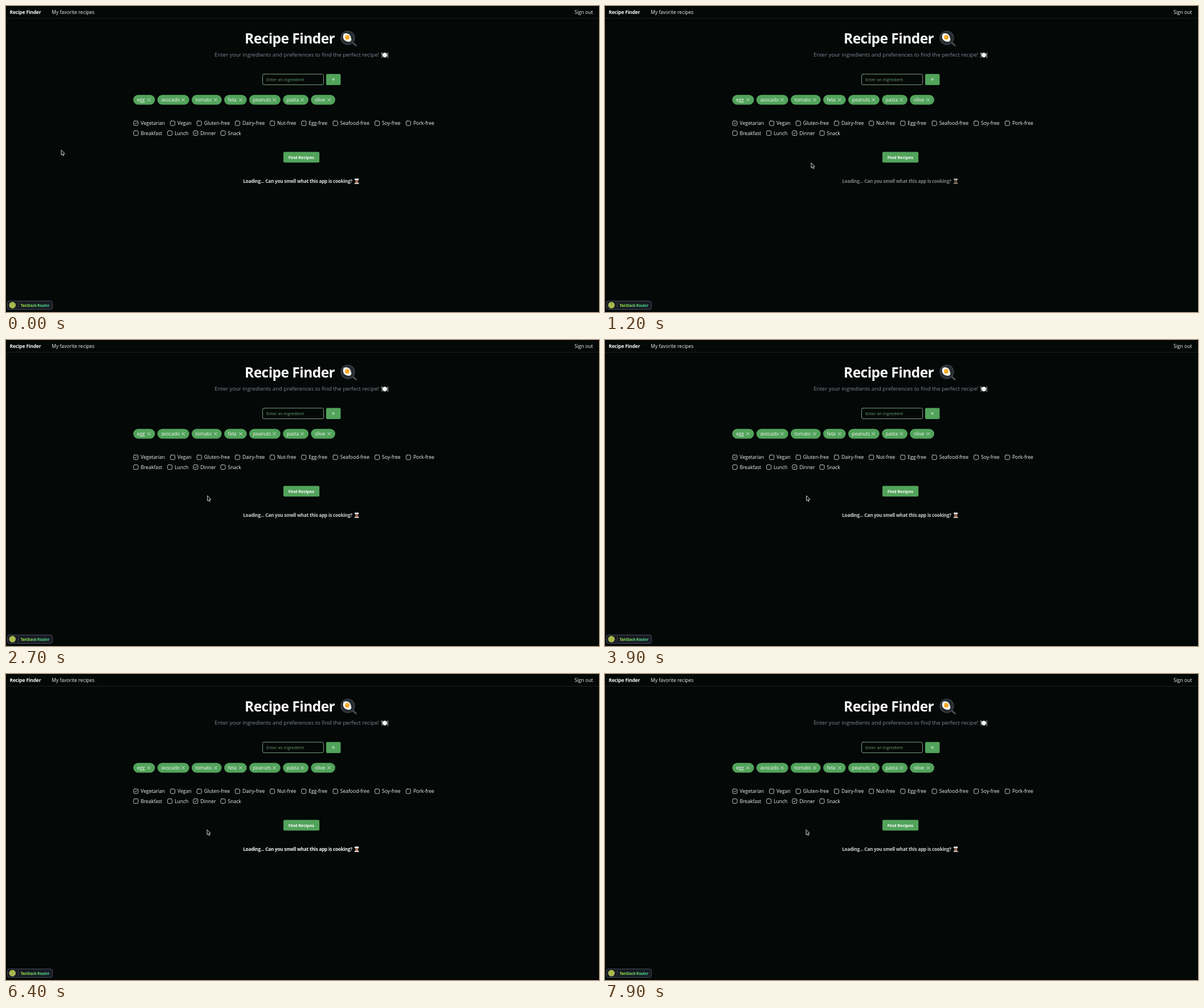
Write an HTML page with a canvas that moves like this. It is 1041x538 px and loops after 8 s.

```html
<!DOCTYPE html>
<html lang="en">
<head>
<meta charset="utf-8">
<title>Recipe Finder</title>
<style>
  html, body { margin: 0; width: 100%; height: 100%; overflow: hidden; background: #040807; }
  canvas { display: block; width: 1041px; height: 538px; }
</style>
</head>
<body>
<canvas id="stage"></canvas>
<script>
const W = 1041, H = 538, LOOP = 8000, STEP = 100;
const BG = '#040807', WHITE = '#f4f6f5', GREEN = '#52a35b';
const canvas = document.getElementById('stage');
const ctx = canvas.getContext('2d');
const dpr = window.devicePixelRatio || 1;
canvas.width = W * dpr;
canvas.height = H * dpr;

function text(str, x, y, size, color = WHITE, bold = false) {
  ctx.font = `${bold ? 700 : 400} ${size}px "Open Sans", "Noto Sans", sans-serif`;
  ctx.letterSpacing = bold ? `${-0.022 * size}px` : '0px';
  ctx.fillStyle = color;
  ctx.fillText(str, x, y);
}

function box(x, y, w, h, r, fill, stroke, line = 1) {
  ctx.beginPath();
  ctx.roundRect(x, y, w, h, r);
  if (fill) { ctx.fillStyle = fill; ctx.fill(); }
  if (stroke) { ctx.strokeStyle = stroke; ctx.lineWidth = line; ctx.stroke(); }
}

function ellipse(x, y, rx, ry, color, turn = 0) {
  ctx.beginPath();
  ctx.ellipse(x, y, rx, ry, turn, 0, Math.PI * 2);
  ctx.fillStyle = color;
  ctx.fill();
}

function lines(color, width, ...paths) {
  ctx.strokeStyle = color;
  ctx.lineWidth = width;
  ctx.lineCap = ctx.lineJoin = 'round';
  ctx.beginPath();
  for (const [x, y, ...rest] of paths) {
    ctx.moveTo(x, y);
    for (let i = 0; i < rest.length; i += 2) ctx.lineTo(rest[i], rest[i + 1]);
  }
  ctx.stroke();
}

function drawPan() {
  lines('#454b50', 3.2, [608, 64, 614.3, 69.4]);
  ellipse(600, 56, 12.6, 12.6, '#3b4348');
  ellipse(600, 56, 11, 11, '#252c31');
  ellipse(598.6, 55.2, 7.6, 6.5, '#f7f5f0', 0.9);
  ellipse(601.8, 58.8, 4.6, 4, '#f7f5f0');
  ellipse(596, 52, 4, 3.7, '#f7f5f0');
  ellipse(599, 55, 3.9, 3.9, '#f5a51d');
  ellipse(597.8, 53.8, 1.2, 0.9, '#ffd36b', -0.7);
}

function drawPlate() {
  ellipse(665, 86.3, 4.2, 4.2, '#d9dee0');
  ellipse(665, 86.3, 2.7, 2.7, '#f4f6f6');
  lines('#b9c2c6', 0.8, [660, 84.6, 660, 91], [659.2, 82, 659.2, 84.6, 660.8, 84.6, 660.8, 82]);
  lines('#b9c2c6', 1.1, [670.2, 82, 670.2, 91]);
}

function drawCook() {
  ellipse(615.7, 308.4, 2.7, 2.9, '#b77a52');
  ctx.fillStyle = '#3a2a22';
  ctx.fillRect(612.8, 306.1, 5.8, 1.1);
  ellipse(613.6, 304.7, 1.9, 1.5, '#f1f1ee');
  ellipse(617.7, 304.7, 1.9, 1.5, '#f1f1ee');
  box(613, 303.6, 5.4, 2.9, 0.8, '#f1f1ee');
  box(611.8, 310.6, 7.8, 2.4, [1.6, 1.6, 0, 0], '#dfe3e4');
  lines('#c0463c', 0.7, [614.6, 310.9, 616.8, 310.9]);
}

function drawHeader() {
  text('Recipe Finder', 6.5, 13.6, 8.5, WHITE, true);
  text('My favorite recipes', 80.3, 13.6, 8.5);
  text('Sign out', 998, 13.6, 8.55);
  ctx.fillStyle = '#1c2321';
  ctx.fillRect(0, 21, W, 1);

  text('Recipe Finder', 419, 66, 24.5, '#fafafa', true);
  drawPan();
  text('Enter your ingredients and preferences to find the perfect recipe!', 366.3, 89.3, 9.56, '#7f8996');
  drawPlate();
}

function drawForm() {
  box(450.5, 119.8, 107, 18.7, 2.5, null, '#86b08c', 0.9);
  text('Enter an ingredient', 457, 132, 7.42, '#6b9d73');
  box(562, 119.4, 25.5, 19.5, 2, GREEN);
  lines('#e6f2e7', 0.8, [572.2, 129.1, 577, 129.1], [574.6, 126.7, 574.6, 131.5]);

  const chips = [
    ['egg', 223.4, 261.5], ['avocado', 265.8, 321.6], ['tomato', 326, 378.6],
    ['feta', 383, 422.6], ['peanuts', 427, 481.8], ['pasta', 486.2, 531], ['olive', 535.3, 578]
  ];
  for (const [name, left, right] of chips) {
    box(left, 156.2, right - left, 17.4, 8.7, GREEN);
    text(name, left + 6.6, 168.2, 8.4);
    const x = right - 10.7, y = 165, r = 2.6;
    lines(WHITE, 0.75, [x - r, y - r, x + r, y + r], [x - r, y + r, x + r, y - r]);
  }

  box(487, 256.6, 63.2, 18.6, 2, GREEN);
  text('Find Recipes', 495.8, 269.1, 7.6, '#fafafa', true);
}

function drawChecks() {
  const rows = [
    [206.2, [['Vegetarian', 228], ['Vegan', 292.6], ['Gluten-free', 339.2], ['Dairy-free', 406.4],
      ['Nut-free', 467.6], ['Egg-free', 522.8], ['Seafood-free', 578.2], ['Soy-free', 651.6], ['Pork-free', 706.4]]],
    [223.5, [['Breakfast', 228], ['Lunch', 287.6], ['Dinner', 332.8], ['Snack', 381]]]
  ];
  const checked = ['Vegetarian', 'Dinner'];
  for (const [y, items] of rows) {
    for (const [name, x] of items) {
      box(x - 4, y - 4, 8, 8, 1.8, null, '#d5d9d7', 0.9);
      if (checked.includes(name)) lines(WHITE, 0.8, [x - 2, y + 0.1, x - 0.6, y + 1.5, x + 2.1, y - 1.5]);
      text(name, x + 8.5, y + 3.1, 8.55);
    }
  }
}

function drawBadge() {
  box(2.5, 518.5, 79, 15, 3, '#191c24', '#434857');
  ellipse(11.3, 526, 5.8, 5.8, '#a9b84c');
  ctx.fillStyle = '#343946';
  ctx.fillRect(21, 521, 1, 10);
  const fade = ctx.createLinearGradient(26, 0, 77, 0);
  fade.addColorStop(0, '#a3e635');
  fade.addColorStop(1, '#34d8a0');
  text('TanStack Router', 25.8, 528.5, 6.45, fade, true);
}

// Time easing of cubic-bezier(.4, 0, .6, 1)
function ease(x) {
  let lo = 0, hi = 1;
  for (let i = 0; i < 20; i++) {
    const s = (lo + hi) / 2, q = 1 - s;
    if (1.2 * q * q * s + 1.8 * q * s * s + s ** 3 < x) lo = s; else hi = s;
  }
  return lo * lo * (3 - 2 * lo);
}

function drawLoading(t) {
  const u = ((t - 300) / 1000 + 2) % 2;
  ctx.globalAlpha = 1 - 0.5 * ease(1 - Math.abs(1 - u));
  text('Loading... Can you smell what this app is cooking?', 416.2, 311.2, 8.1, '#fafafa', true);
  drawCook();
  ctx.globalAlpha = 1;
}

const path = [
  [0, 97, 253.5], [100, 100, 253.8], [900, 366, 277], [1200, 362, 276.2], [1500, 359, 273.5],
  [1800, 357, 274], [1900, 353.6, 274.1], [5400, 353.6, 274.1], [5500, 353, 274.1], [LOOP, 353, 274.1]
];

function pointerAt(t) {
  const i = path.findIndex(p => p[0] > t);
  const [t0, x0, y0] = path[i - 1], [t1, x1, y1] = path[i];
  const k = (t - t0) / (t1 - t0), s = k * k * (3 - 2 * k);
  return [x0 + (x1 - x0) * s, y0 + (y1 - y0) * s];
}

function drawPointer(t) {
  const [x, y] = pointerAt(t);
  ctx.save();
  ctx.translate(x, y);
  ctx.beginPath();
  ctx.moveTo(0, 0);
  for (const [px, py] of [[0, 8.6], [1.9, 6.9], [3.4, 9.9], [4.8, 9.2], [3.4, 6.4], [5.8, 6.1]]) ctx.lineTo(px, py);
  ctx.closePath();
  ctx.fillStyle = '#0a0c0c';
  ctx.fill();
  ctx.strokeStyle = '#e4e6e6';
  ctx.lineWidth = 0.9;
  ctx.stroke();
  ctx.restore();
}

function draw() {
  const t = Math.floor((performance.now() % LOOP) / STEP) * STEP;
  ctx.setTransform(dpr, 0, 0, dpr, 0, 0);
  ctx.fillStyle = BG;
  ctx.fillRect(0, 0, W, H);
  drawHeader();
  drawForm();
  drawChecks();
  drawLoading(t);
  drawBadge();
  drawPointer(t);
  requestAnimationFrame(draw);
}
draw();
</script>
</body>
</html>
```
